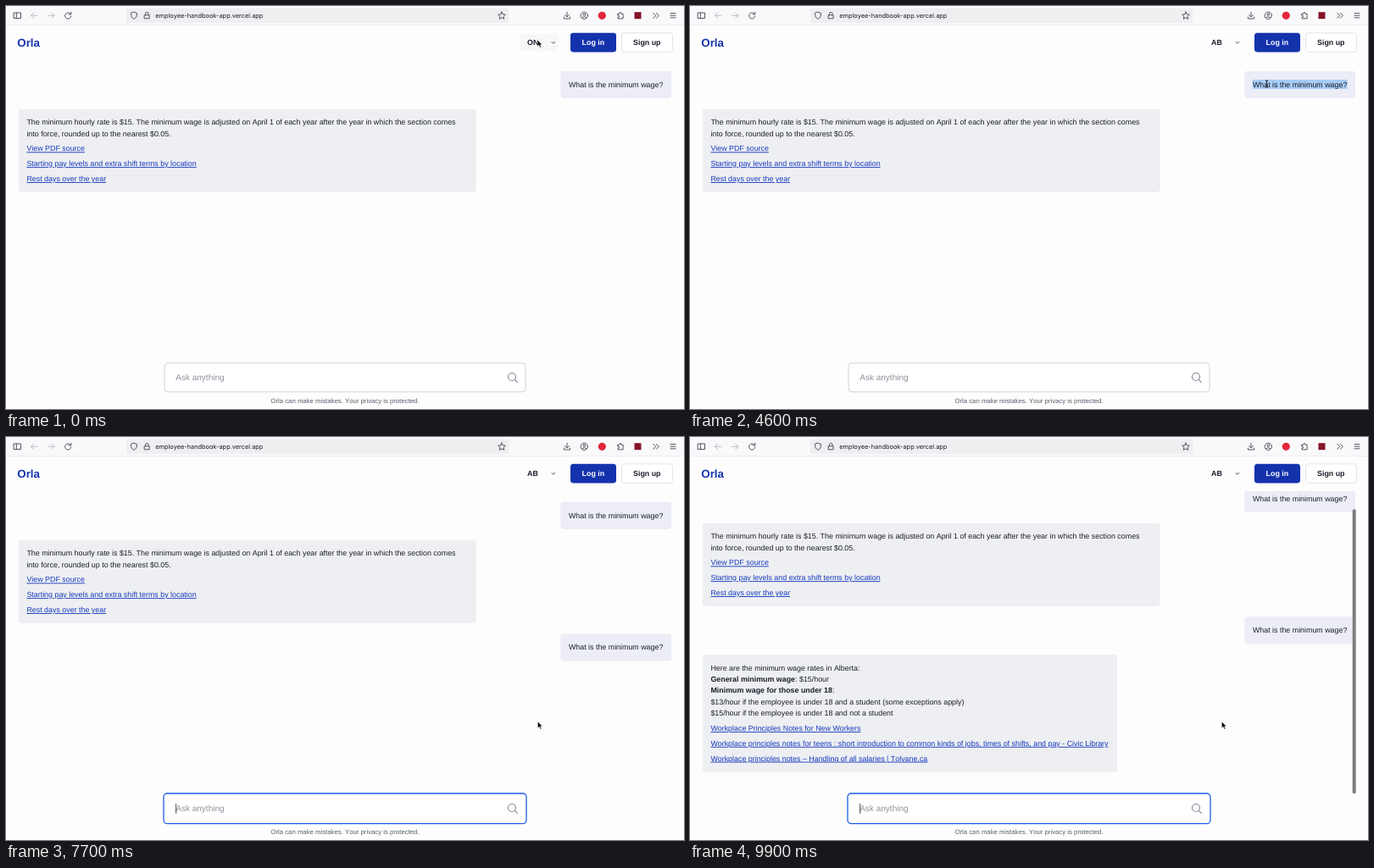
Recreate the animation shown at these times as an HTML page. Size 800 by 476 pixels, loop 10000 ms.

```html
<!DOCTYPE html>
<html lang="en">
<head>
<meta charset="utf-8">
<title>Handbook chat</title>
<style>
  html, body { margin: 0; width: 800px; height: 476px; overflow: hidden; background: #fdfdfe; }
  svg { display: block; }
  text { font: 8.89px "Liberation Sans", Arial, sans-serif; font-kerning: none; fill: #1b1e2a; text-rendering: geometricPrecision; white-space: pre; }
  .bold { font-weight: bold; }
  .brand { font-size: 13.33px; font-weight: bold; fill: #1734ad; }
  .link { fill: #1338bd; text-decoration: underline; }
  .ui { font: 7.39px Inter, sans-serif; }
  .white { fill: #fff; }
  .field { font-size: 10px; }
  .hint { fill: #8e929d; }
  .foot { font-size: 7.78px; fill: #5b606c; text-anchor: middle; }
  .icon { fill: none; stroke: #4c4c55; stroke-width: .95; stroke-linecap: round; stroke-linejoin: round; }
  .dim { stroke: #b9b9bf; }
  .card { filter: drop-shadow(0 .6px .5px #0002); }
  .answer { fill: #eeeff2; }
  .ask { fill: #ecedf7; }
</style>
</head>
<body>
<svg width="800" height="476" viewBox="0 0 800 476">
  <defs>
    <clipPath id="view"><rect y="64" width="800" height="356"/></clipPath>
  </defs>

  <!-- Browser toolbar -->
  <rect width="800" height="22" fill="#f9f9fb"/>
  <rect y="22" width="800" height=".6" fill="#e6e6ea"/>
  <rect x="142" y="2.5" width="451.5" height="17.5" rx="2.5" fill="#efeff2"/>
  <g class="icon">
    <path d="M9.5 8h8v6.5h-8zM12.3 8v6.5"/>
    <path class="dim" d="M37 11.3h-7.5m3.3-3.3-3.3 3.3 3.3 3.3M49.5 11.3H57m-3.3-3.3 3.3 3.3-3.3 3.3"/>
    <path d="M76 9.2A3.6 3.6 0 1 0 76.8 12M76.8 7.3v2.6h-2.6"/>
    <path d="M151 7.2l3.6 1.4c0 3.5-1 5.4-3.6 6.8-2.6-1.4-3.6-3.3-3.6-6.8z"/>
    <path d="M163.5 10.8h5.6v4h-5.6zM164.5 10.8V9.2a1.8 1.8 0 0 1 3.6 0v1.6"/>
    <path d="M585 7l1.3 2.8 3 .4-2.2 2.1.6 3-2.7-1.5-2.7 1.5.6-3-2.2-2.1 3-.4z"/>
    <path d="M662 7.3v5.4m-2.4-2.2 2.4 2.3 2.4-2.3M658.4 13v2h7.2v-2"/>
    <circle cx="682.3" cy="11.3" r="4.2"/>
    <circle cx="682.3" cy="10" r="1.3"/><path d="M680 13.5q2.3-1.8 4.6 0"/>
    <path d="M722 9.2h1.8a1.2 1.2 0 1 1 2.3 0h2v5.7H722v-1.7a1.2 1.2 0 1 0 0-2.3z"/>
    <path d="M763.8 8.3l2.9 3-2.9 3M767.4 8.3l2.9 3-2.9 3M784 8.6h6M784 11.2h6M784 13.8h6"/>
  </g>
  <circle cx="703.3" cy="11.3" r="4.6" fill="#e2263c"/>
  <rect x="741.5" y="7.2" width="8" height="8" fill="#861326"/>
  <text class="ui" x="176.3" y="14">employee-handbook-app.vercel.app</text>

  <!-- Page header -->
  <text class="brand" x="13.3" y="48">Orla</text>
  <rect id="select" x="606.5" y="33" width="45" height="20" rx="3"/>
  <text id="region" class="bold" x="615" y="46.2"></text>
  <path class="icon" d="M644 42.4l1.9 1.9 1.9-1.9"/>
  <rect x="666" y="31.8" width="54" height="22.6" rx="3.3" fill="#1532ad"/>
  <text class="bold white" x="679.6" y="46.2">Log in</text>
  <rect x="726.5" y="31.8" width="60" height="22.6" rx="3.3" fill="#fff" stroke="#d6d8df" stroke-width=".7"/>
  <text class="bold" x="740" y="46.2">Sign up</text>

  <!-- Conversation -->
  <g clip-path="url(#view)">
    <g id="chat">
      <rect class="card ask" x="654.7" y="77" width="130.3" height="31.5" rx="3.5"/>
      <rect id="marked" x="663.8" y="87" width="111.8" height="11" fill="#a6cbf4"/>
      <text x="663.9" y="95.8">What is the minimum wage?</text>
      <rect class="card answer" x="15" y="122" width="539.3" height="97.6" rx="3.5"/>
      <text x="24.4" y="140.2">The minimum hourly rate is $15. The minimum wage is adjusted on April 1 of each year after the year in which the section comes</text>
      <text x="24.4" y="153.5">into force, rounded up to the nearest $0.05.</text>
      <text class="link" x="24.4" y="171.4">View PDF source</text>
      <text class="link" x="24.4" y="189.2">Starting pay levels and extra shift terms by location</text>
      <text class="link" x="24.4" y="207">Rest days over the year</text>
      <g id="sent">
        <rect class="card ask" x="654.7" y="232.8" width="130.3" height="31.5" rx="3.5"/>
        <text x="663.9" y="251.4">What is the minimum wage?</text>
      </g>
      <g id="reply">
        <rect id="replyBox" class="card answer" x="15" y="277" rx="3.5"/>
        <g id="lines"></g>
        <g id="links">
          <text class="link" x="24.4" y="367">Workplace Principles Notes for New Workers</text>
          <text class="link" x="24.4" y="384.8">Workplace principles notes for teens : short introduction to common kinds of jobs, times of shifts, and pay - Civic Library</text>
          <text class="link" x="24.4" y="402.6">Workplace principles notes – Handling of all salaries | Tolvane.ca</text>
        </g>
      </g>
    </g>
  </g>
  <rect id="thumb" x="781.7" width="4" height="336" rx="2" fill="#7e7e81"/>

  <!-- Input -->
  <rect id="box" fill="#fff"/>
  <text id="entry" class="field" x="200.3" y="442.4"></text>
  <rect id="caret" y="433" width=".8" height="11.8" fill="#222"/>
  <g class="icon" style="stroke:#858b98;stroke-width:1.2">
    <circle cx="597" cy="438" r="4.5"/><path d="M600.3 441.3l3 3"/>
  </g>
  <text class="foot" x="400" y="468.6">Orla can make mistakes. Your privacy is protected.</text>

  <g id="menu">
    <rect class="card" x="602.5" y="57" width="56" height="200" rx="3.5" fill="#f5f5f6" stroke="#d3d3d7" stroke-width=".6"/>
    <rect id="hover" x="605" width="51" height="15" rx="2.5" fill="#3478f6"/>
    <g id="options"></g>
  </g>

  <path id="arrow" d="M0 0v8l1.9-1.7 1.3 2.9 1.4-.6-1.3-2.8h2.5z" fill="#000" stroke="#fff" stroke-width=".6"/>
  <path id="beam" d="M-1.6-4.2Q0-4.2 0-3V3Q0 4.2-1.6 4.2M1.6-4.2Q0-4.2 0-3M0 3Q0 4.2 1.6 4.2M-1 1h2" fill="none" stroke="#111" stroke-width=".9"/>
</svg>
<script>
const $ = id => document.getElementById(id);
const set = (el, attrs) => { for (const k in attrs) el.setAttribute(k, attrs[k]); };
const show = (id, on) => { $(id).style.display = on ? '' : 'none'; };
const add = (parent, tag, attrs, text = '') => {
  const el = document.createElementNS('http://www.w3.org/2000/svg', tag);
  set(el, attrs);
  el.textContent = text;
  return parent.appendChild(el);
};
const ease = p => { p = Math.min(1, Math.max(0, p)); return p * p * (3 - 2 * p); };

const LOOP = 10000, STEP = 100, LINE = 13.35;
const OPEN = 500, PICK = 2300, MARK = 4500, FOCUS = 5600, PASTE = 6100, SEND = 6400;
const STREAM = 8400, DONE = 9300, BLINK = 566;
const question = 'What is the minimum wage?';

// Pointer stops: time, x, y
const path = [
  [0, 627, 40], [500, 626, 43], [1300, 632, 197], [1500, 632, 195], [2200, 640, 70],
  [2500, 641, 78], [2900, 641, 78], [3500, 648, 254], [4300, 680.5, 92], [4600, 680.5, 92],
  [5600, 330, 431], [6900, 330, 431], [7600, 627.3, 336], [LOOP, 627.3, 336]
];
function pointer(t) {
  const i = path.findIndex(p => p[0] > t);
  const [a, b] = [path[i - 1], path[i]];
  const p = ease((t - a[0]) / (b[0] - a[0]));
  return [a[1] + (b[1] - a[1]) * p, a[2] + (b[2] - a[2]) * p];
}

// Reply lines: bold part, plain part
const reply = [
  ['', 'Here are the minimum wage rates in Alberta:'],
  ['General minimum wage', ': $15/hour'],
  ['Minimum wage for those under 18', ':'],
  ['', '$13/hour if the employee is under 18 and a student (some exceptions apply)'],
  ['', '$15/hour if the employee is under 18 and not a student']
];
const total = reply.flat().join('').length;
const rows = reply.map((_, i) => {
  const el = add($('lines'), 'text', { x: 24.4, y: 295.6 + i * LINE });
  return { el, parts: [add(el, 'tspan', { class: 'bold' }), add(el, 'tspan', {})] };
});

const options = 'AB BC MB NB NL NS NT NU ON PE QC SK YT'.split(' ').map((name, i) =>
  add($('options'), 'text', { x: 617, y: 70.6 + i * 15 }, name));
const tick = add($('options'), 'path', { d: 'M608.5 188l1.6 1.9 2.8-4.2' });

function drawMenu(t, y) {
  const open = t >= OPEN && t < PICK;
  show('menu', open);
  const over = Math.floor((y - 60.5) / 15);
  const at = over >= 0 && over < options.length ? over : 8;
  $('hover').setAttribute('y', 60.5 + at * 15);
  options.forEach((el, i) => set(el, { class: i === at ? 'ui white' : 'ui' }));
  set(tick, { class: 'icon', style: at === 8 ? 'stroke:#fff' : '' });
  $('region').textContent = t < PICK ? 'ON' : 'AB';
  $('select').setAttribute('fill', t < PICK ? '#f7f7f9' : t < 3000 ? '#fafafb' : '#fdfdfe');
}

function drawReply(t) {
  show('reply', t > STREAM);
  if (t <= STREAM) return;
  let left = Math.round(total * Math.min(1, (t - STREAM) / (DONE - STREAM)));
  let count = 0, width = 0;
  rows.forEach(({ el, parts }, i) => {
    if (left > 0) count = i + 1;
    parts.forEach((span, k) => {
      span.textContent = reply[i][k].slice(0, left);
      left = Math.max(0, left - reply[i][k].length);
    });
    width = Math.max(width, el.getComputedTextLength());
  });
  const done = t >= DONE;
  show('links', done);
  set($('replyBox'), { width: done ? 488.8 : width + 19, height: done ? 138.6 : count * LINE + 18 });
}

function drawInput(t) {
  const focus = t >= FOCUS, filled = t >= PASTE && t < SEND;
  set($('box'), focus
    ? { x: 186, y: 421, width: 428, height: 35.7, rx: 4.2, stroke: '#1f5fe8', 'stroke-width': 1.3 }
    : { x: 187, y: 421.8, width: 426, height: 34, rx: 3.8, stroke: '#cbced6', 'stroke-width': .9 });
  const entry = $('entry');
  entry.textContent = filled ? question : 'Ask anything';
  set(entry, { class: filled ? 'field' : 'field hint' });
  const blinkOn = t < SEND || Math.floor((t - SEND) / BLINK) % 2 === 0;
  show('caret', focus && blinkOn);
  $('caret').setAttribute('x', filled ? 200.5 + entry.getComputedTextLength() : 200.3);
}

function draw(t) {
  const [x, y] = pointer(t);
  const overText = (x > 664 && x < 776 && y > 86 && y < 99) || (x > 187 && x < 590 && y > 421);
  show('arrow', !overText);
  show('beam', overText);
  for (const id of ['arrow', 'beam']) $(id).setAttribute('transform', `translate(${x} ${y})`);

  drawMenu(t, y);
  show('marked', t >= MARK && t < FOCUS);
  show('sent', t >= SEND);
  drawReply(t);
  drawInput(t);

  const scroll = 20 * ease((t - DONE) / 430);
  $('chat').setAttribute('transform', `translate(0 ${-scroll})`);
  show('thumb', t >= DONE);
  $('thumb').setAttribute('y', 65.2 + scroll);
}

const start = performance.now();
function frame() {
  const t = (performance.now() - start) % LOOP;
  draw(Math.floor(t / STEP) * STEP);
  requestAnimationFrame(frame);
}
frame();
</script>
</body>
</html>
```
